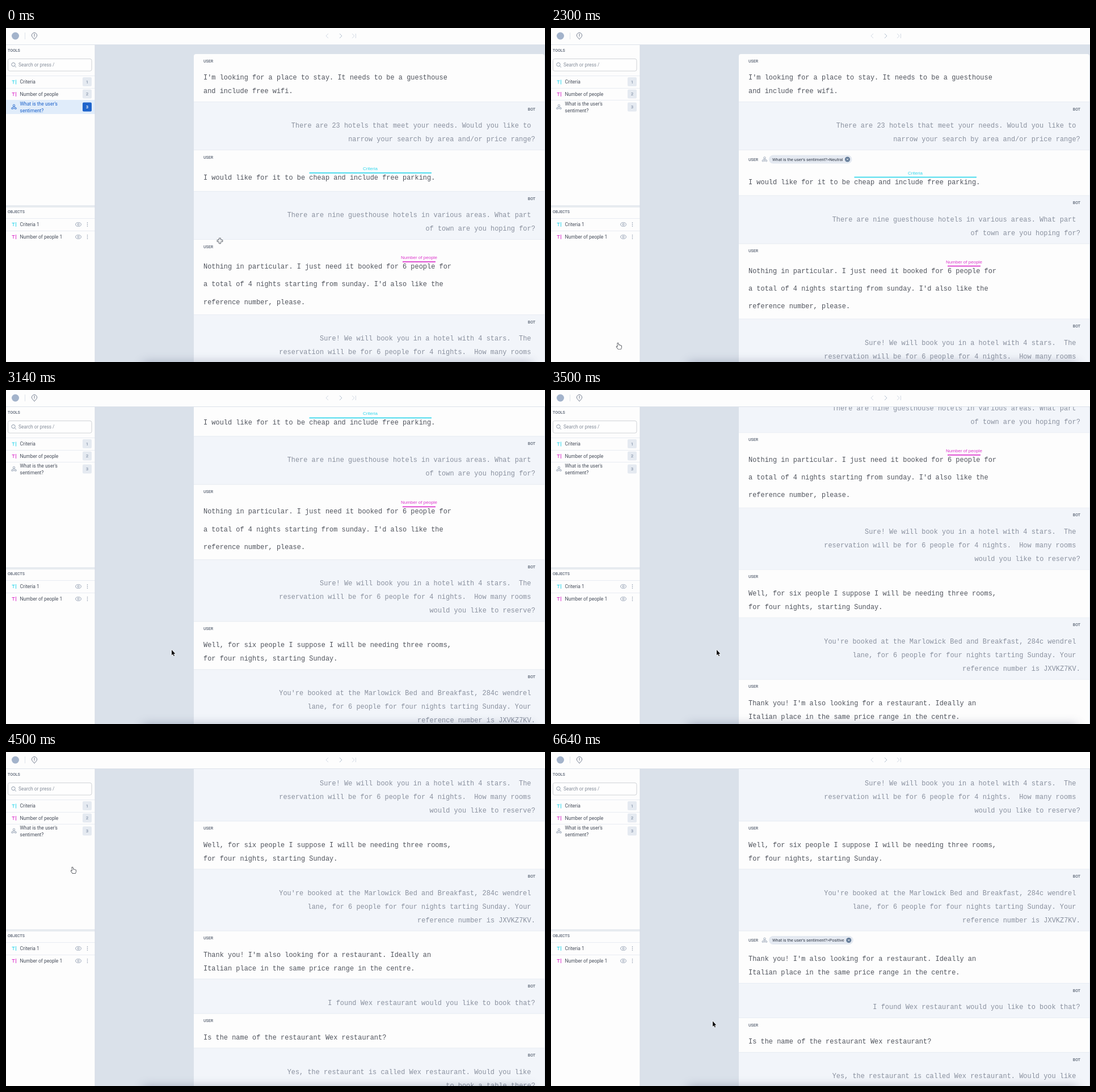
Recreate the animation shown at these times as an HTML page with a canvas. Size 950 px wide and 590 px high, loop 6670 ms.

```html
<!DOCTYPE html>
<html lang="en">
<head>
<meta charset="utf-8">
<title>Conversation labelling</title>
<style>
html, body { margin: 0; width: 100%; height: 100%; overflow: hidden; background: #fdfdfd; }
canvas { display: block; width: 950px; height: 590px; }
</style>
</head>
<body>
<canvas id="stage"></canvas>
<script>
const W = 950, H = 590, LOOP = 6670;
const canvas = document.getElementById('stage');
const ctx = canvas.getContext('2d');
const dpr = window.devicePixelRatio || 1;
canvas.width = W * dpr;
canvas.height = H * dpr;

const UI = 'Roboto, sans-serif', SANS = '"Liberation Sans", Arial, sans-serif';
const MONO = '11.95px "Liberation Mono", "Courier New", monospace', ADVANCE = 7.17;
const WHITE = '#fdfdfd', LINE = '#e8ecf2', BLUE = '#1d63cb', PALE = '#e0ecfa';
const GREY = '#8b98ad', INK = '#474e5b', CYAN = '#31d6ec', PINK = '#dc35cc';
const QUESTION = "What is the user's sentiment?";

const blocks = [
  { who: 'USER', h: 85, lines: ["I'm looking for a place to stay. It needs to be a guesthouse", 'and include free wifi.'] },
  { who: 'BOT', h: 85, lines: ['There are 23 hotels that meet your needs. Would you like to ', 'narrow your search by area and/or price range?'] },
  { who: 'USER', h: 73, first: 48, lines: ['I would like for it to be cheap and include free parking.'],
    mark: { text: 'Criteria', color: CYAN, x: 642, x0: 534.5, x1: 750 } },
  { who: 'BOT', h: 85, lines: ['There are nine guesthouse hotels in various areas. What part ', 'of town are you hoping for?'] },
  { who: 'USER', h: 133, first: 47, pitch: 31.3, lines: ['Nothing in particular. I just need it booked for 6 people for', "a total of 4 nights starting from sunday. I'd also like the", 'reference number, please.'],
    mark: { text: 'Number of people', color: PINK, x: 728, x0: 699, x1: 757 } },
  { who: 'BOT', h: 109, lines: ['Sure! We will book you in a hotel with 4 stars.  The ', 'reservation will be for 6 people for 4 nights.  How many rooms ', 'would you like to reserve?'] },
  { who: 'USER', h: 85, lines: ['Well, for six people I suppose I will be needing three rooms,', 'for four nights, starting Sunday.'] },
  { who: 'BOT', h: 109, lines: ["You're booked at the Marlowick Bed and Breakfast, 284c wendrel ", 'lane, for 6 people for four nights tarting Sunday. Your ', 'reference number is JXVKZ7KV.'] },
  { who: 'USER', h: 85, lines: ["Thank you! I'm also looking for a restaurant. Ideally an", 'Italian place in the same price range in the centre.'] },
  { who: 'BOT', h: 61, lines: ['I found Wex restaurant would you like to book that?'] },
  { who: 'USER', h: 61, lines: ['Is the name of the restaurant Wex restaurant?'] },
  { who: 'BOT', h: 85, lines: ['Yes, the restaurant is called Wex restaurant. Would you like ', 'to book a table there?'] }
];

// Each round: tool picked, message clicked, menu opened, option chosen, Done pressed.
const rounds = [
  { block: 2, tool: -1, panel: 720, open: 1180, pick: 1730, done: 2180, answer: 'Neutral' },
  { block: 8, tool: 4660, panel: 5050, open: 5430, pick: 5800, done: 6240, answer: 'Positive' }
];

// time, x, y of the pointer's hot spot
const path = [
  [0, 377, 376], [120, 377, 376], [560, 440, 262], [740, 440, 262], [1130, 138, 67.5], [1230, 138, 67.5],
  [1400, 126.5, 106], [1680, 45, 130], [1780, 45, 130], [2120, 80, 578], [2220, 80, 578],
  [2520, 292, 459], [4260, 292, 459], [4600, 72, 138], [4700, 72, 138], [5000, 430, 358], [5070, 430, 358],
  [5400, 138, 67.5], [5490, 138, 67.5], [5730, 45, 96], [5840, 45, 96], [6190, 80, 578], [6280, 80, 578],
  [6570, 285, 475.5], [LOOP, 285, 475.5]
];
const scrollPath = [[0, 0], [2430, 0], [2800, 127.5], [3500, 305.5], [3940, 420.5], [4250, 501], [LOOP, 501]];

function at(keys, t, col, smooth) {
  let i = 0;
  while (i < keys.length - 2 && t >= keys[i + 1][0]) i++;
  const a = keys[i], b = keys[i + 1];
  let k = Math.min(1, (t - a[0]) / (b[0] - a[0]));
  if (smooth) k = k * k * (3 - 2 * k);
  return a[col] + (b[col] - a[col]) * k;
}

function rect(x, y, w, h, color) {
  ctx.fillStyle = color;
  ctx.fillRect(x, y, w, h);
}

function round(x, y, w, h, r, fill, stroke, lw = 1) {
  ctx.beginPath();
  ctx.roundRect(x, y, w, h, r);
  if (fill) { ctx.fillStyle = fill; ctx.fill(); }
  if (stroke) { ctx.strokeStyle = stroke; ctx.lineWidth = lw; ctx.stroke(); }
}

function text(str, x, y, font, color, align = 'left') {
  ctx.font = font;
  ctx.fillStyle = color;
  ctx.textAlign = align;
  ctx.fillText(str, x, y);
}

const ui = (str, x, y, color = INK, size = 8.5, weight = 400, align = 'left') =>
  text(str, x, y + size * 0.35, `${weight} ${size}px ${UI}`, color, align);

const heading = (str, x, y, align) => ui(str, x, y, '#5a6474', 7, 500, align);

function stroke(points, color, lw = 1) {
  ctx.beginPath();
  points.forEach(([x, y], i) => i ? ctx.lineTo(x, y) : ctx.moveTo(x, y));
  ctx.strokeStyle = color;
  ctx.lineWidth = lw;
  ctx.stroke();
}

function circle(x, y, r, fill, line, lw = 1) {
  ctx.beginPath();
  ctx.arc(x, y, r, 0, 7);
  if (fill) { ctx.fillStyle = fill; ctx.fill(); }
  if (line) { ctx.strokeStyle = line; ctx.lineWidth = lw; ctx.stroke(); }
}

const chevron = (x, y, dx, color) => stroke([[x - dx, y - 4], [x + dx, y], [x - dx, y + 4]], color);

function textIcon(y, color) {
  stroke([[10.5, y - 2.5], [15.5, y - 2.5]], color);
  stroke([[13, y - 2.5], [13, y + 3]], color);
  stroke([[17.5, y - 4], [17.5, y + 4]], color);
}

function nodesIcon(x, y, color) {
  circle(x, y - 2.7, 1.7, null, color, 0.8);
  circle(x - 3, y + 2.5, 1.4, null, color, 0.8);
  circle(x + 3, y + 2.5, 1.4, null, color, 0.8);
  stroke([[x, y - 1], [x, y + 4]], color, 0.8);
  stroke([[x - 2.6, y + 1.2], [x - 1, y - 1.2]], color, 0.8);
  stroke([[x + 2.6, y + 1.2], [x + 1, y - 1.2]], color, 0.8);
}

function badge(n, y, on) {
  round(135, y - 8, 16, 16, 2, on ? BLUE : '#e5eaf1');
  ui(n, 143, y, on ? '#fff' : GREY, 8, 500, 'center');
}

function drawHeader() {
  rect(0, 0, W, 29, WHITE);
  rect(0, 29, W, 1, '#dce2ea');
  circle(16.5, 14, 6.5, '#a3b3cb');
  rect(33, 8, 1, 12, '#dde2ea');
  ctx.beginPath();
  ctx.arc(50, 13, 4.6, Math.PI * 0.75, Math.PI * 0.25);
  ctx.lineTo(50, 20);
  ctx.closePath();
  ctx.strokeStyle = '#667084';
  ctx.lineWidth = 0.9;
  ctx.stroke();
  rect(49.5, 10.5, 1, 3.5, '#566074');
  rect(49.5, 15, 1, 1, '#566074');
  chevron(566, 14, -2, '#d3dae4');
  chevron(590, 14, 2, '#b2bece');
  chevron(612, 14, 2, '#d3dae4');
  stroke([[616.5, 10], [616.5, 18]], '#d3dae4');
}

function drawTools(active) {
  heading('TOOLS', 3, 39.5);
  round(3.5, 54.5, 147.5, 21.5, 3, '#fefefe', '#d0d3d6');
  circle(13, 64.5, 3.2, null, '#8490a2', 0.9);
  stroke([[15.4, 67], [18, 69.5]], '#8490a2', 0.9);
  ui('Search or press /', 22, 65.5, '#868e9b', 8.4);
  for (const y of [84, 106, 127]) rect(0, y, 157, 1, LINE);
  if (active) rect(0, 127, 157, 25, PALE);
  textIcon(95.5, CYAN);
  ui('Criteria', 24.5, 95.5);
  badge('1', 95, false);
  textIcon(117, PINK);
  ui('Number of people', 24.5, 117);
  badge('2', 116.5, false);
  const color = active ? BLUE : INK;
  nodesIcon(14, 139.5, active ? BLUE : GREY);
  ui("What is the user's", 24.5, 134, color);
  ui('sentiment?', 24.5, 146, color);
  badge('3', 139.5, active);

  rect(0, 313, 157, 4, '#e7ebf0');
  heading('OBJECTS', 3, 325);
  rect(0, 336, 157, 1, LINE);
  rect(0, 358, 157, 1, LINE);
  drawObject('Criteria 1', 347, CYAN);
  drawObject('Number of people 1', 369, PINK);
}

function drawObject(name, y, color) {
  textIcon(y, color);
  ui(name, 24.5, y + 0.3);
  ctx.beginPath();
  ctx.ellipse(127.5, y, 4.8, 3.3, 0, 0, 7);
  ctx.strokeStyle = GREY;
  ctx.lineWidth = 0.9;
  ctx.stroke();
  circle(127.5, y, 1.5, null, GREY, 0.9);
  for (const d of [-3, 0, 3]) circle(143.5, y + d, 0.75, '#7d8aa0');
}

function drawPanel(r, t, x, y) {
  const open = t >= r.open && t < r.pick, picked = t >= r.pick;
  rect(0, 30, 157, 54, PALE);
  ui(QUESTION, 8.5, 43.5, BLUE);
  badge('3', 43.5, true);
  if (!picked) round(2.5, 55.5, 150, 25, 4, null, '#9fc2f3', 2);
  round(3.5, 56.5, 148, 23, 3, WHITE, picked ? '#b9c6d8' : BLUE, picked ? 1 : 1.5);
  const overArrow = x > 132 && x < 150 && y > 56 && y < 80;
  if (overArrow) rect(133, 58, 16, 20, '#e8edf3');
  ui(picked ? r.answer : 'Select one', 11, 68.3, picked ? INK : '#9ba3af', 8.4);
  if (open && !overArrow) rect(11, 63, 0.9, 10, '#444');
  const d = open ? 1 : -1;
  stroke([[138, 68 + d], [140, 68 - d], [142, 68 + d]], '#6d7889');
  if (open) {
    ctx.save();
    ctx.shadowColor = 'rgba(40,60,90,.2)';
    ctx.shadowBlur = 4;
    round(1.5, 86, 150, 59, 3, WHITE);
    ctx.restore();
    ['Positive', 'Negative', 'Neutral'].forEach((name, i) => {
      const cy = 97 + i * 17.2;
      if (x < 152 && Math.abs(y + 1 - cy) < 10.5) rect(2, cy - 8, 149, 16, '#e8ecf1');
      ui(name, 13, cy, '#343b48', 8.4);
    });
  }
  round(1, 571, 152, 22, 3, '#1f66cf');
  ui('Done', 77, 581.3, '#fff', 7.5, 500, 'center');
}

function drawChat(t) {
  ctx.save();
  ctx.beginPath();
  ctx.rect(157, 30, W - 157, H - 30);
  ctx.clip();
  rect(157, 30, W - 157, H - 30, '#dae1ea');
  let top = 46 - at(scrollPath, t, 1, false);
  ctx.beginPath();
  ctx.roundRect(331, top, 618, 1300, 4);
  ctx.clip();
  blocks.forEach((b, i) => {
    const r = rounds.find(q => q.block === i);
    const tagged = r && t >= r.pick;
    const shift = tagged ? 7.5 : 0;
    const h = b.h + shift;
    if (top < H && top + h > 30) drawBlock(b, top, h, shift, tagged && r.answer);
    if (r && t >= r.panel && t < r.done) rect(331, top, 1.5, h - 1, '#22229a');
    top += h;
  });
  ctx.restore();
}

function drawBlock(b, top, h, shift, answer) {
  const bot = b.who === 'BOT';
  rect(331, top, 618, h, bot ? '#f2f5fa' : WHITE);
  rect(331, top + h - 1, 618, 1, '#e8ecf3');
  const cy = top + 12 + shift / 2 + (shift ? 0.3 : 0);
  heading(b.who, bot ? 933 : 348, cy + 0.3, bot ? 'right' : 'left');
  if (answer) {
    const label = QUESTION + '>' + answer;
    nodesIcon(376.5, cy, GREY);
    ctx.font = `400 7.45px ${UI}`;
    const w = ctx.measureText(label).width;
    round(384, cy - 7.5, w + 22, 15, 7.5, '#e4e9f1');
    ui(label, 390, cy + 0.2, '#303846', 7.45);
    const x = 390 + w + 8;
    circle(x, cy, 4.5, '#627a97');
    stroke([[x - 1.6, cy - 1.6], [x + 1.6, cy + 1.6]], '#fff', 0.9);
    stroke([[x - 1.6, cy + 1.6], [x + 1.6, cy - 1.6]], '#fff', 0.9);
  }
  const base = top + (b.first || 41) + shift + 4;
  b.lines.forEach((line, i) => {
    const x = bot ? 933 - line.length * ADVANCE : 348;
    text(line, x, base + i * (b.pitch || 24), MONO, bot ? '#8a919f' : '#50545d');
  });
  if (b.mark) {
    const { text: name, color, x, x0, x1 } = b.mark;
    text(name, x, base - 16.8, `8.05px ${SANS}`, color, 'center');
    rect(x0, base - 12.8, x1 - x0, 1.7, color);
  }
}

function drawShade() {
  ctx.save();
  ctx.shadowColor = 'rgba(55,65,105,.4)';
  ctx.shadowBlur = 18;
  rect(242, 592, 685, 30, '#888');
  ctx.restore();
}

function shape(points, x, y, lw, fill, line) {
  ctx.beginPath();
  points.forEach(([px, py]) => ctx.lineTo(x + px, y + py));
  ctx.closePath();
  ctx.lineJoin = 'round';
  ctx.strokeStyle = line;
  ctx.lineWidth = lw;
  ctx.stroke();
  ctx.fillStyle = fill;
  ctx.fill();
  ctx.lineJoin = 'miter';
}

const ARROW = [[0, 0], [0, 9.5], [2.2, 7.6], [3.6, 11], [5, 10.4], [3.6, 7.1], [6.4, 7]];
const HAND = [[-0.8, 0], [0.6, 0], [1, 3.6], [2.6, 3.4], [3, 4], [4.4, 3.8], [5, 4.6], [6.2, 5], [6, 8], [5, 10.5], [0.4, 10.5], [-2.6, 6.4], [-1.8, 5.6], [-0.4, 6.8]];
const CROSS = [[-1.2, -4.5], [1.2, -4.5], [1.2, -1.2], [4.5, -1.2], [4.5, 1.2], [1.2, 1.2], [1.2, 4.5], [-1.2, 4.5], [-1.2, 1.2], [-4.5, 1.2], [-4.5, -1.2], [-1.2, -1.2]];

function drawPointer(x, y, tool) {
  if (x < 157) shape(HAND, x, y, 1.4, '#fff', '#30343c');
  else if (tool) shape(CROSS, x, y, 1.5, '#fff', '#333a44');
  else shape(ARROW, x, y, 1.4, '#0c0c0e', '#fff');
}

function draw(t) {
  ctx.setTransform(dpr, 0, 0, dpr, 0, 0);
  rect(0, 0, W, H, WHITE);
  drawChat(t);
  const x = at(path, t, 1, true), y = at(path, t, 2, true);
  const tool = rounds.some(r => t >= r.tool && t < r.panel);
  const current = rounds.find(r => t >= r.panel && t < r.done);
  if (current) drawPanel(current, t, x, y);
  else drawTools(tool);
  rect(156.5, 30, 1, H - 30, '#d3dae3');
  drawHeader();
  drawShade();
  drawPointer(x, y, tool);
}

const start = performance.now();
function frame() {
  draw((performance.now() - start) % LOOP);
  requestAnimationFrame(frame);
}
frame();
</script>
</body>
</html>
```
